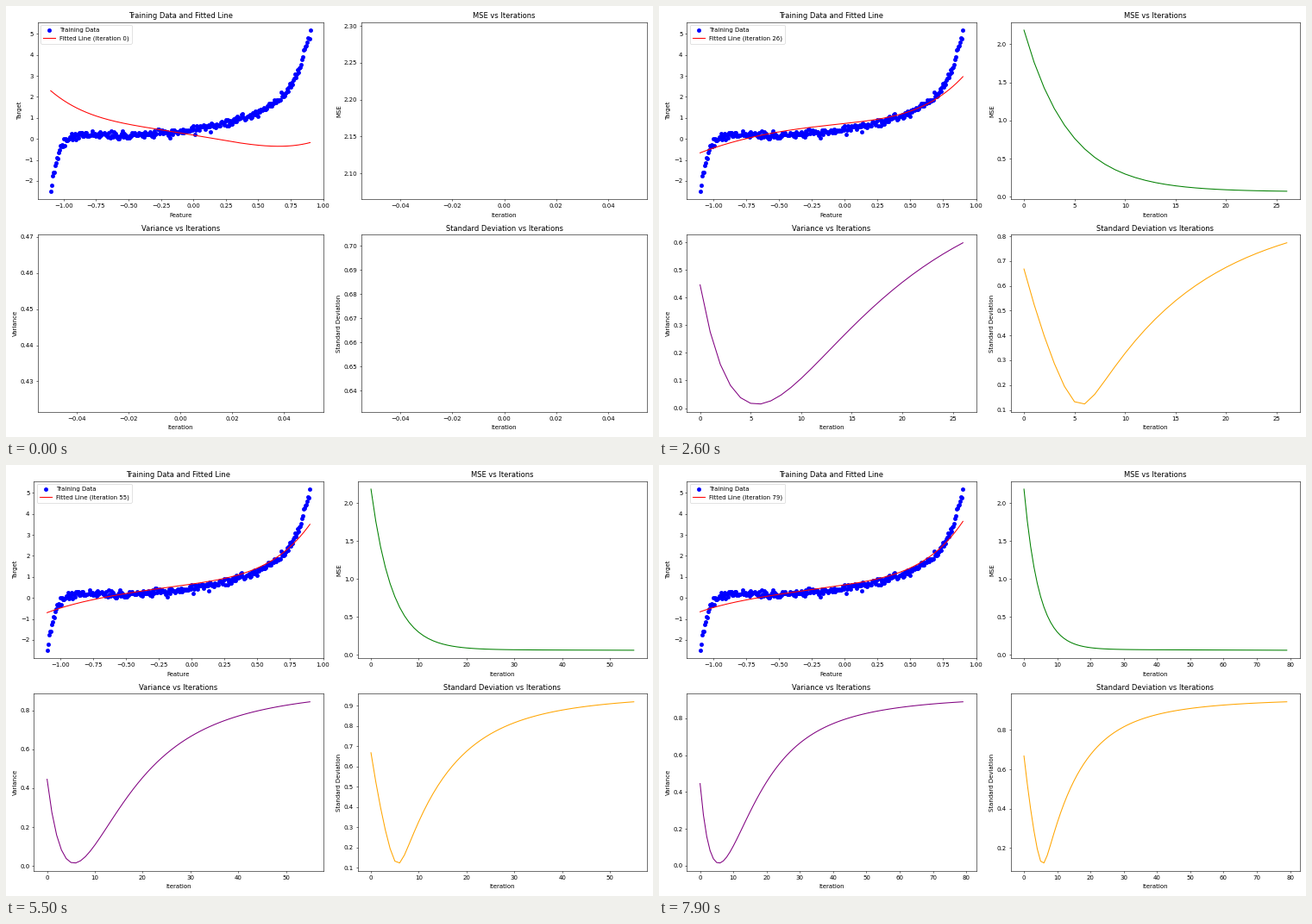
These frames come from a looping animation (750x500 px, 8000 ms). A matplotlib script:

```python
import numpy as np
import matplotlib.pyplot as plt
from matplotlib.animation import FuncAnimation
from numpy.polynomial.polynomial import polyval

STEPS = 80
W, H = 750, 500

# Training data: a parabola with exponential tails, plus noise
rng = np.random.default_rng(4)
x = np.linspace(-1.1, 0.9, 300)
trend = (0.45 + x + 0.9 * x ** 2
         + 3.1 * np.exp(9 * (x - 0.9)) - 2.93 * np.exp(-17 * (x + 1.1)))
y = np.clip(trend + rng.normal(0, 0.09, x.size), trend[0], trend[-1])
y[0], y[-1] = trend[0], trend[-1]

# Fitted polynomial: its shape at three iterations fixes a fast and a slow mode
key_steps = [0, 16, 79]
key_coefs = [
    [0.18, -1.05, -0.15, 0.23, 0.9, -0.08],
    [0.71, 0.42, 0.1, 1.1, 0.61, 0.1],
    [0.62, 0.95, 0.45, 1.1, 1.05, 0.53],
]


def decay(i):
    return np.array([1, 0.895 ** i, 0.966 ** i])


modes = np.linalg.solve([decay(i) for i in key_steps], key_coefs)


def fitted(i):
    return polyval(x, decay(i) @ modes)


# Metrics: the spread passes through zero slope while the line turns over
it = np.arange(STEPS)
mse = 2.115 * 0.801 ** it + 0.07 - 0.00015 * it
slope = 0.95 - 1.327 * 0.898 ** it - 0.28 * 0.963 ** it
std = np.hypot(slope, 0.12)


def label(ax, title, xlabel, ylabel):
    ax.set_title(title)
    ax.set_xlabel(xlabel, labelpad=6.5)
    ax.set_ylabel(ylabel)


fig, axes = plt.subplots(2, 2, figsize=(W / 50, H / 50), dpi=50)
fit_ax = axes[0, 0]
fit_ax.scatter(x, y, color="blue", label="Training Data")
fit_line, = fit_ax.plot(x, fitted(0), color="red", label="Fitted Line (Iteration 0)")
label(fit_ax, "Training Data and Fitted Line", "Feature", "Target")
fit_text = fit_ax.legend(loc="upper left").get_texts()[1]

panels = []
for ax, name, values, color in [
    (axes[0, 1], "MSE", mse, "green"),
    (axes[1, 0], "Variance", std ** 2, "purple"),
    (axes[1, 1], "Standard Deviation", std, "orange"),
]:
    line, = ax.plot(it[:1], values[:1], color=color)
    label(ax, f"{name} vs Iterations", "Iteration", name)
    panels.append((ax, line, values))


def update(i):
    fit_line.set_ydata(fitted(i))
    fit_text.set_text(f"Fitted Line (Iteration {i})")
    for ax, line, values in panels:
        line.set_data(it[:i + 1], values[:i + 1])
        ax.relim()
        ax.autoscale_view()
    # Columns follow the tick label widths, rows stay put
    fig.tight_layout()
    fig.subplots_adjust(right=743 / W, top=1 - 18.6 / H, bottom=1 - 471 / H, hspace=0.2)


anim = FuncAnimation(fig, update, frames=STEPS, interval=100, repeat=True)
plt.show()
```
